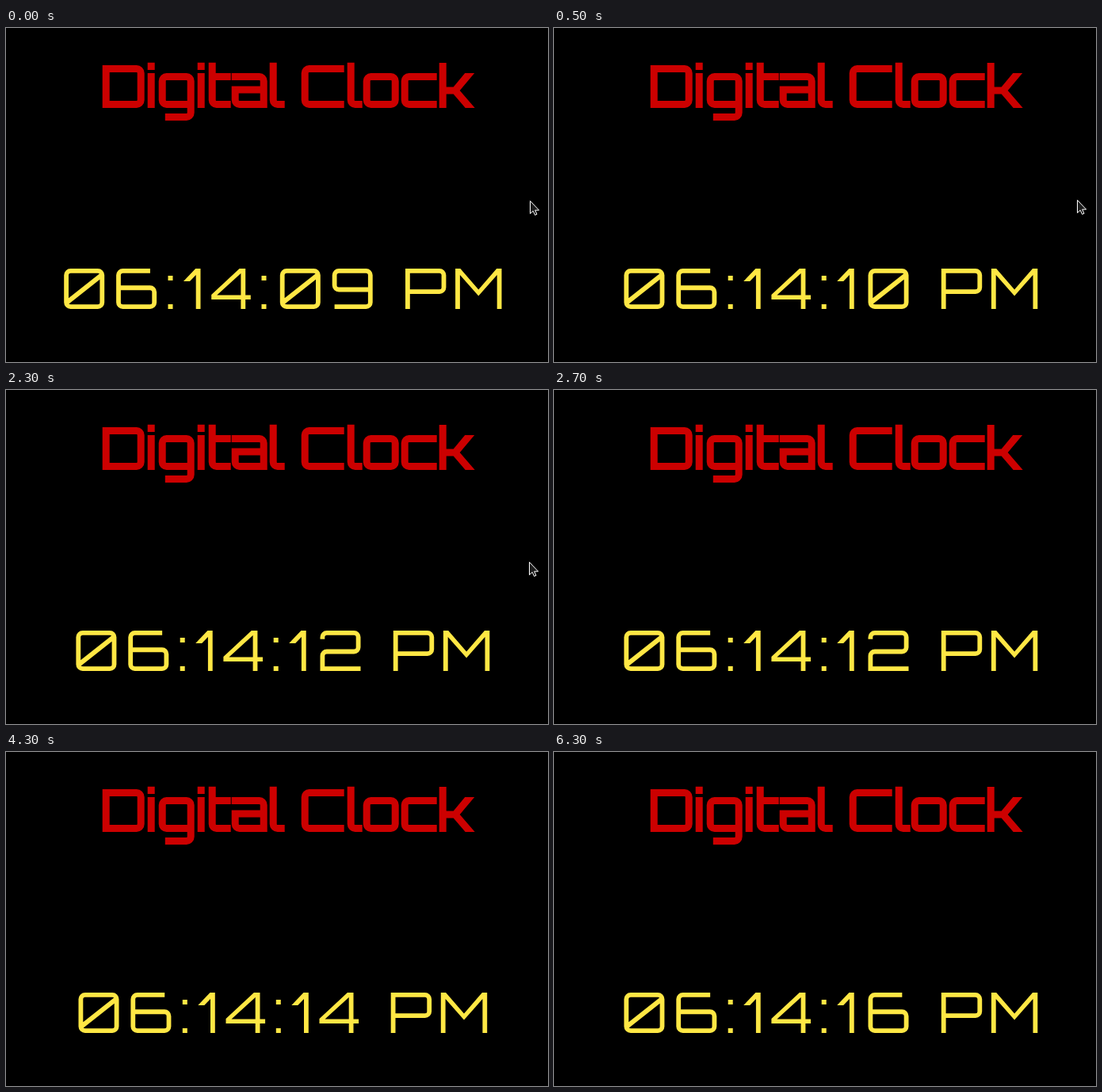
These frames come from a looping animation (684x422 px, 6600 ms). An HTML page:

```html
<!DOCTYPE html>
<html lang="en">
<head>
<meta charset="utf-8">
<title>Digital Clock</title>
<style>
  html, body { margin: 0; width: 100%; height: 100%; overflow: hidden; background: #000; }
  svg { display: block; width: 684px; height: 422px; overflow: hidden; }
  .line { fill: none; }
  .solid { stroke: none; fill-rule: evenodd; }
  #title { fill: #c00; stroke: #c00; }
  #strip { fill: #ffe744; stroke: #ffe744; animation: tick 6.6s infinite; }
  #pointer { animation: point 6.6s infinite; }

  /* One reading per stage height, moved up once a second */
  @keyframes tick {
    0% { transform: translateY(0); animation-timing-function: step-end; }
    4.545% { transform: translateY(-422px); animation-timing-function: steps(6); }
    95.454%, 100% { transform: translateY(-2954px); }
  }
  @keyframes point {
    0% { transform: translate(661px, 218px); animation-timing-function: step-end; }
    7.575% { transform: translate(660px, 217px); animation-timing-function: step-end; }
    37.878% { transform: translate(660px, 217px); animation-timing-function: steps(2, start); }
    40.908% { transform: translate(677px, 201px); animation-timing-function: step-end; }
    40.909%, 100% { transform: translate(720px, 190px); }
  }
</style>
</head>
<body>
<svg viewBox="0 0 684 422">
  <g id="title" role="img" aria-label="Digital Clock"></g>
  <g id="strip"></g>
  <path id="pointer" d="M.5 .5V16.6L4.2 13.2L6.6 18.4L9 17.3L6.7 12.2H11.6Z"
        fill="#1c1c1c" stroke="#fff" stroke-linejoin="round"/>
</svg>
<script>
// Letters are strokes between named columns and rows, as fractions of the glyph box
const cols = { o: 0, n: .18, c: .5, i: .84, e: 1 };
const rows = { a: -.3, q: -.09, u: 0, f: .15, h: .21, m: .475, v: .52, p: .57, k: .8, j: .85, d: 1, g: 1.26 };
const radius = 5.4;

// "lt" is left column, top row; capitals keep the corner sharp
function locate(name, w, h, half) {
  const [c, r] = name.toLowerCase();
  return {
    x: { l: half, r: w - half }[c] ?? cols[c] * w,
    y: { t: half, b: h - half }[r] ?? rows[r] * h,
    sharp: name < 'a'
  };
}

function bend(pts) {
  const toward = (a, b) => {
    const k = radius / Math.hypot(b.x - a.x, b.y - a.y);
    return `${a.x + (b.x - a.x) * k} ${a.y + (b.y - a.y) * k}`;
  };
  return pts.map((p, i) => {
    const prev = pts[i - 1], next = pts[i + 1];
    if (!prev || !next || p.sharp) return `${prev ? 'L' : 'M'}${p.x} ${p.y}`;
    const cross = (p.x - prev.x) * (next.y - p.y) - (p.y - prev.y) * (next.x - p.x);
    return `L${toward(p, prev)}A${radius} ${radius} 0 0 ${cross > 0 ? 1 : 0} ${toward(p, next)}`;
  }).join('');
}

// Maker of stroked glyphs with one height, weight, side bearing and gap
const pen = (h, weight, bearing, gap) => (w, strokes, advance = w + gap) => ({
  h, weight, bearing, advance, kind: 'line',
  d: strokes.split('/').map(s => bend(s.split(' ').map(p => locate(p, w, h, weight / 2)))).join('')
});
const solid = (h, bearing, advance, d) => ({ h, bearing, advance, d, kind: 'solid' });
const space = advance => solid(0, 0, advance, '');

function write(parent, face, text, x, baseline) {
  for (const c of text) {
    const g = face[c];
    const path = document.createElementNS('http://www.w3.org/2000/svg', 'path');
    path.setAttribute('d', g.d);
    path.setAttribute('class', g.kind);
    path.setAttribute('stroke-width', g.weight || 0);
    path.setAttribute('transform', `translate(${x + g.bearing} ${baseline - g.h})`);
    parent.append(path);
    x += g.advance;
  }
}

const ring = 'ct rt rb lb lt ct', cup = 'et lt lb eb', foot = 'la lb eb';

const thin = pen(51, 5.8, 4, 14.9);
const clock = {
  0: thin(51, ring + '/lj rf'),
  1: solid(51, .2, 35.5, 'M15.2 0h6.3v51h-5.8V8l-7.7 8H0Z'),
  2: thin(51, 'lh lt rt rv lv LB eb'),
  3: thin(51, 'lh lt rt RM nm/cm rm rb lb lk'),
  4: solid(51, -.1, 59.7, 'M35.4 0H43V33.4h6.6v5.7H43V51h-5.8V39.1H0V33ZM37.2 6L7 33.4h30.2Z'),
  5: thin(51, 'et LT LM rm rb lb lk'),
  6: thin(51, 'it lt lb rb rm lm'),
  9: thin(51, 'lb rb rt lt lv rv'),
  ':': solid(51, 3.5, 22.8, 'M0 9h6v6h-6ZM0 45h6v6h-6Z'),
  ' ': space(26.4),
  P: thin(51.4, 'ld LT rt rp lp', 63.7),
  M: solid(51, 3.4, 73.5, 'M0 51V0h6.3l22.9 26.4L52.1 0h6.3v51h-5.8V8L29.2 34.6L5.8 8v43Z')
};

const caps = pen(54, 9, 0, 4), bold = pen(44, 9, 0, 3);
const heading = {
  D: caps(53, 'ct rt rb LB LT ct'),
  C: caps(54, cup),
  i: bold(9, 'la lq/lu ld', 14),
  g: bold(45, 'rk rt lt lb rb/rk rg ng', 49),
  t: bold(28, foot + '/lt et', 29),
  a: bold(45, 'ot rt RB lb LM rm'),
  l: bold(19, foot, 20),
  o: bold(45, ring),
  c: bold(45, cup),
  k: solid(44, 0, 45, 'M0-13H9V17.5H18L32.5 0h12L26 22L45 44H33L18 26.5H9V44H0Z'),
  ' ': space(20)
};

write(document.getElementById('title'), heading, 'Digital Clock', 121.7, 101);

for (let i = 0; i < 8; i++) {
  const text = `06:14:${String(9 + i).padStart(2, '0')} PM`;
  const width = [...text].reduce((sum, c) => sum + clock[c].advance, 0);
  write(document.getElementById('strip'), clock, text, 353.2 - width / 2, 355 + 422 * i);
}
</script>
</body>
</html>
```
